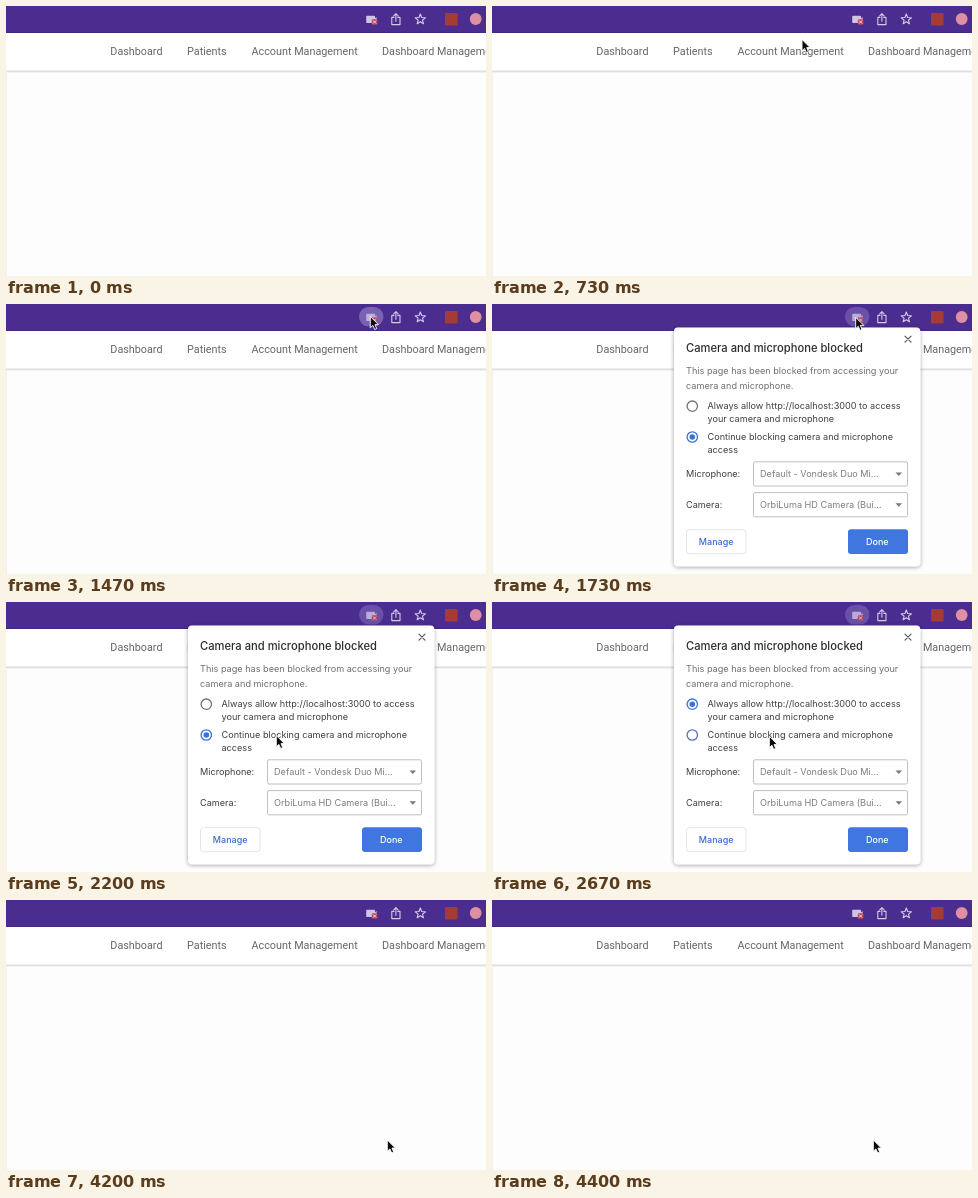
An HTML page for the animation above (4990 ms loop, 480 by 270 pixels).

```html
<!DOCTYPE html>
<html lang="en">
<head>
<meta charset="utf-8">
<title>Unblock camera and microphone</title>
<style>
  html, body { margin: 0; width: 100%; height: 100%; overflow: hidden; background: #fdfdfd; }
  svg { display: block; width: 100vw; height: 100vh; }
  .nav { font: 10.8px Roboto, sans-serif; fill: #666; }
  .dlg { font: 9.13px Inter, sans-serif; fill: #3c3f43; }
  .dlg .title { font-size: 11.2px; font-weight: 500; fill: #2b2d30; }
  .dlg .soft { fill: #6b6e72; }
  .dlg .pick { fill: #7b7d80; }
  .dlg .btn { font-size: 9px; font-weight: 500; text-anchor: middle; }
  .line { fill: none; stroke-linecap: round; stroke-linejoin: round; }
</style>
</head>
<body>
<svg viewBox="0 0 480 270" preserveAspectRatio="none">
  <defs>
    <linearGradient id="edge" x2="0" y2="1">
      <stop offset="0" stop-color="#d2d2d2"/>
      <stop offset="1" stop-color="#fdfdfd"/>
    </linearGradient>
    <filter id="shadow" x="-10%" y="-10%" width="120%" height="120%">
      <feDropShadow dx="0" dy="1" stdDeviation="2.2" flood-color="#000" flood-opacity=".36"/>
    </filter>
  </defs>

  <!-- Page -->
  <rect width="480" height="270" fill="#fdfdfd"/>
  <rect y="66" width="1" height="204" fill="#f0f0f0"/>
  <rect y="27" width="480" height="38" fill="#fff"/>
  <rect y="64.6" width="480" height="2.6" fill="url(#edge)"/>
  <g class="nav">
    <text x="104.3" y="49">Dashboard</text>
    <text x="181" y="49">Patients</text>
    <text x="245.5" y="49">Account Management</text>
    <text x="376" y="49">Dashboard Management</text>
  </g>

  <!-- Browser bar -->
  <rect width="480" height="27" fill="#4b2c8f"/>
  <rect y="26" width="480" height="1" fill="#442784"/>
  <rect id="pill" x="353" y="3" width="24.5" height="19.5" rx="9.7" fill="#8a74bd"/>
  <g id="cam">
    <path d="M361 9.8h7.2a.8.8 0 0 1 .8.8v1.6l1.6-1.3v5.2l-1.6-1.2v1.3a.8.8 0 0 1-.8.8H361a.8.8 0 0 1-.8-.8v-5.6a.8.8 0 0 1 .8-.8z" fill="#cfc4e4"/>
    <rect x="365.8" y="13.2" width="5.6" height="5.6" rx="1.2" fill="#c0485a"/>
    <path class="line" d="M367.4 14.8l2.4 2.4m0-2.4l-2.4 2.4" stroke="#f6e6ec" stroke-width=".9"/>
  </g>
  <g class="line" stroke="#d5cbe8" stroke-width="1.1">
    <path d="M388 11.4h-2.2v7.2h8.2v-7.2h-2.2M389.9 15.2V7.8m-2.2 2.1l2.2-2.2 2.2 2.2"/>
    <path id="star"/>
  </g>
  <rect x="439" y="7" width="12.6" height="12.4" rx="1" fill="#a63a35"/>
  <circle cx="469.7" cy="13" r="5.9" fill="#de8fa3"/>

  <!-- Permission bubble -->
  <g id="bubble" class="dlg">
    <rect x="182" y="23.5" width="246.3" height="238.8" rx="4" fill="#fff" filter="url(#shadow)"/>
    <path class="line" d="M413 32.2l6 6m0-6l-6 6" stroke="#55585c" stroke-width="1.2"/>
    <text class="title" x="194" y="48.2">Camera and microphone blocked</text>
    <text class="soft" x="194" y="70.3">This page has been blocked from accessing your</text>
    <text class="soft" x="194" y="85.4">camera and microphone.</text>
    <text x="215.5" y="105.3">Always allow http://localhost:3000 to access</text>
    <text x="215.5" y="117.7">your camera and microphone</text>
    <text x="215.5" y="136.2">Continue blocking camera and microphone</text>
    <text x="215.5" y="148.5">access</text>
    <g fill="none" stroke-width="1.3">
      <circle id="ring0" cx="200.3" cy="102.2" r="5.2"/>
      <circle id="ring1" cx="200.3" cy="133" r="5.2"/>
    </g>
    <g fill="#3b70db">
      <circle id="dot0" cx="200.3" cy="102.2"/>
      <circle id="dot1" cx="200.3" cy="133"/>
    </g>
    <text x="194" y="173.2">Microphone:</text>
    <text x="194" y="204">Camera:</text>
    <g fill="#fff" stroke="#bdc0c4">
      <rect x="261.5" y="157.8" width="154" height="24.2" rx="1.5"/>
      <rect x="261.5" y="188.6" width="154" height="24.2" rx="1.5"/>
    </g>
    <text class="pick" x="268" y="173.2">Default - Vondesk Duo Mi...</text>
    <text class="pick" x="268" y="204">OrbiLuma HD Camera (Bui...</text>
    <path d="M403.5 168.4h6.6l-3.3 3.5zM403.5 199.2h6.6l-3.3 3.5z" fill="#76797d"/>
    <rect x="194.5" y="225.7" width="59.5" height="24" rx="3" fill="#fff" stroke="#e2e5ea"/>
    <text class="btn" x="224.2" y="241" fill="#3b6bd0">Manage</text>
    <rect id="done" x="356" y="225.3" width="60" height="24.7" rx="3"/>
    <text class="btn" x="385.3" y="241" fill="#fff">Done</text>
  </g>

  <path id="cursor" d="M0 0V11.3L2.6 8.9L4.4 13L6.4 12.1L4.7 8.1H8.1Z"
        fill="#0c0c0c" stroke="#fff" stroke-width=".9" stroke-linejoin="round"/>
</svg>

<script>
const LOOP = 4990, FPS = 15;
const el = id => document.getElementById(id);
const set = (id, attrs) => {
  for (const name in attrs) el(id).setAttribute(name, attrs[name]);
};
const ramp = (t, from, to) => Math.min(1, Math.max(0, (t - from) / (to - from)));
const ease = p => p < .5 ? 4 * p ** 3 : 1 - (2 - 2 * p) ** 3 / 2;
const mix = (a, b, p) => a + (b - a) * p;
const blend = (a, b, p) => `rgb(${a.map((v, i) => Math.round(mix(v, b[i], p)))})`;

const BLUE = [59, 112, 219], GREY = [112, 115, 119], MUTED = [79, 116, 184];
const BUTTON = [63, 118, 223], HOVER = [60, 107, 208];

// start, end, target x, target y
const moves = [
  [400, 730, 310, 33.5],
  [870, 1330, 364.3, 12.5],
  [1670, 2200, 270.3, 133.5],
  [2200, 2400, 276.5, 133.5],
  [2600, 3130, 381.3, 240]
];

function cursorAt(t) {
  let x = 338, y = 147;
  for (const [from, to, tx, ty] of moves) {
    const p = ease(ramp(t, from, to));
    x = mix(x, tx, p);
    y = mix(y, ty, p);
  }
  return [x, y];
}

function draw(t) {
  const [x, y] = cursorAt(t);
  set('cursor', { transform: `translate(${x} ${y})`, visibility: t > 460 ? 'visible' : 'hidden' });

  const gone = ramp(t, 3935, 4200);
  set('bubble', { opacity: t > 1525 ? 1 - gone : 0 });
  const hover = ramp(t, 1130, 1330) * (1 - gone);
  set('pill', { opacity: hover * (t > 1525 ? .5 : .75) });
  set('cam', { opacity: 1 - .2 * hover });

  const swap = ramp(t, 2200, 2430);
  set('ring0', { stroke: blend(GREY, BLUE, swap) });
  set('ring1', { stroke: blend(BLUE, MUTED, swap) });
  set('dot0', { r: 2.8 * swap });
  set('dot1', { r: 2.8 * (1 - swap) });
  set('done', { fill: blend(BUTTON, HOVER, ramp(t, 3135, 3400)) });
}

const points = Array.from({ length: 10 }, (_, i) => {
  const r = i % 2 ? 2.3 : 5.4, a = Math.PI * (i / 5 - .5);
  return `${414.3 + r * Math.cos(a)} ${13.4 + r * Math.sin(a)}`;
});
set('star', { d: `M${points.join('L')}Z` });

function tick() {
  const t = performance.now() % LOOP;
  draw(Math.floor(t * FPS / 1000 + .06) * 1000 / FPS);
  requestAnimationFrame(tick);
}
tick();
</script>
</body>
</html>
```
